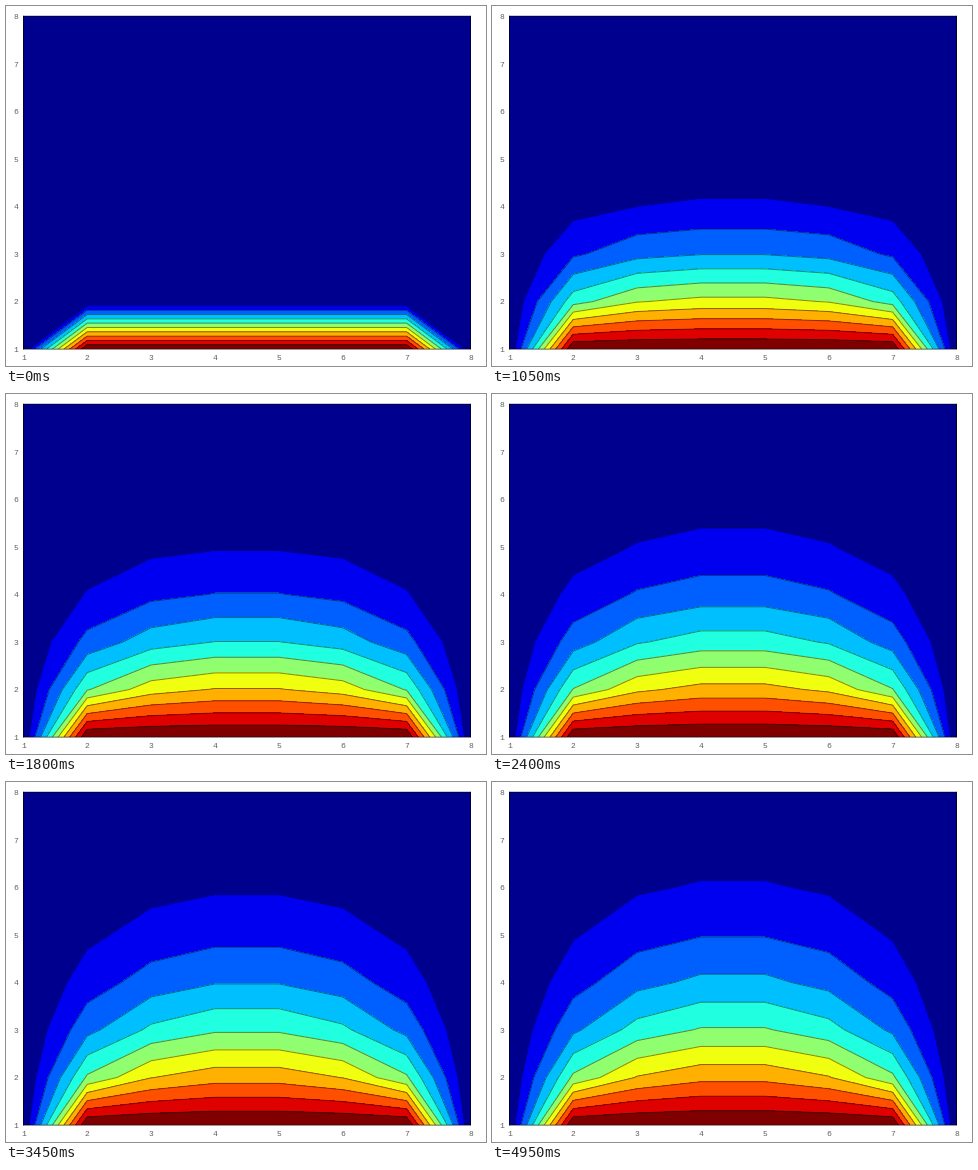
Animation of 480x360 px, one loop 5000 ms. Source, as a matplotlib script:

```python
import numpy as np
import matplotlib.pyplot as plt
from matplotlib.animation import FuncAnimation

WIDTH, HEIGHT, DPI = 480, 360, 100
FRAMES, INTERVAL = 100, 50
SIZE = 8
RATE = 0.08  # diffusion number of the explicit scheme
LEFT, RIGHT, TOP, BOTTOM = 17.3, 464.5, 10.1, 343.1

BANDS = ["#00008f", "#0000f0", "#0060ff", "#00bfff", "#20ffdf", "#8fff70",
         "#f0ff10", "#ffb000", "#ff5000", "#df0000", "#800000"]
LEVELS = np.linspace(0, 1, len(BANDS) + 1)
EDGES = np.r_[-1, LEVELS[1:-1], 2]


def px(size):
    return size * 72 / DPI


def heat_plate():
    """Cold plate with a heated bottom edge, one field per frame."""
    u = np.zeros((SIZE, SIZE))
    u[0, 1:-1] = 1
    fields = []
    for _ in range(FRAMES):
        fields.append(u.copy())
        flow = (u[:-2, 1:-1] + u[2:, 1:-1] + u[1:-1, :-2] + u[1:-1, 2:]
                - 4 * u[1:-1, 1:-1])
        u[1:-1, 1:-1] += RATE * flow
    return fields


fields = heat_plate()
grid = np.arange(1, SIZE + 1)

fig = plt.figure(figsize=(WIDTH / DPI, HEIGHT / DPI), dpi=DPI, facecolor="white")
ax = fig.add_axes([LEFT / WIDTH, 1 - BOTTOM / HEIGHT,
                   (RIGHT - LEFT) / WIDTH, (BOTTOM - TOP) / HEIGHT])
ax.set_xlim(1, SIZE)
ax.set_ylim(1, SIZE)
ax.set_xticks([])
ax.set_yticks([])
for spine in ax.spines.values():
    spine.set_linewidth(px(0.6))
    spine.set_snap(False)

label = dict(fontfamily="Liberation Mono", fontsize=px(8), color="#606060",
             va="center_baseline")
for n in grid:
    part = (n - 1) / (SIZE - 1)
    x = LEFT + part * (RIGHT - LEFT)
    y = BOTTOM - part * (BOTTOM - TOP) + 0.4
    fig.text(x / WIDTH, 1 - 352 / HEIGHT, str(n), ha="center", **label)
    fig.text(12.5 / WIDTH, 1 - y / HEIGHT, str(n), ha="right", **label)

contours = []


def draw(i):
    while contours:
        contours.pop().remove()
    u = fields[i]
    contours.append(ax.contourf(grid, grid, u, levels=EDGES, colors=BANDS,
                                antialiased=False))
    contours.append(ax.contour(grid, grid, u, levels=LEVELS[1:-1],
                               colors="black", linewidths=px(1), alpha=0.45))
    return contours


anim = FuncAnimation(fig, draw, frames=FRAMES, interval=INTERVAL,
                     repeat=True, repeat_delay=0, blit=False)
plt.show()
```
